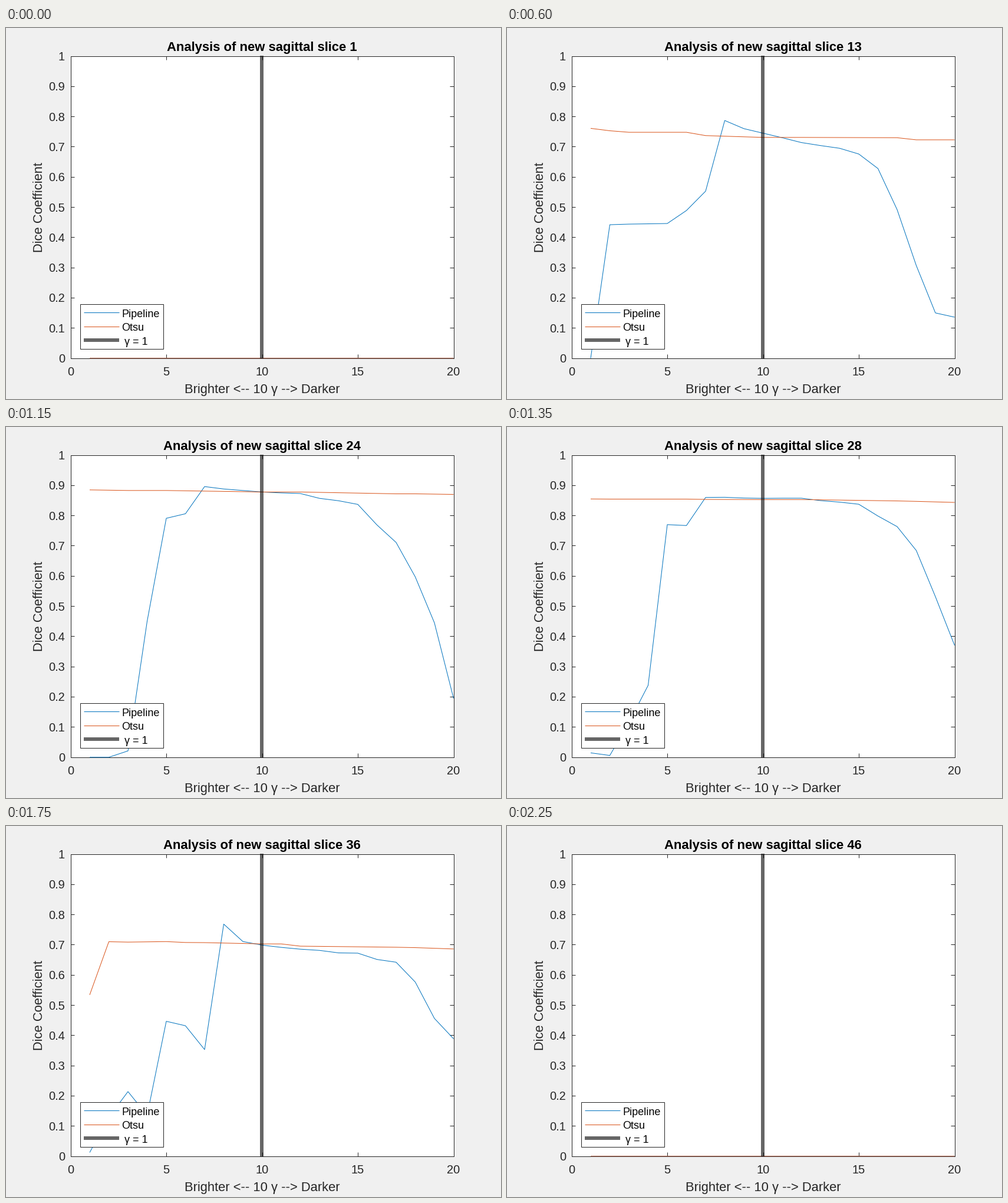
A matplotlib script for the animation above (2.3 s loop, 840x630 px).

```python
import numpy as np
import matplotlib.pyplot as plt
from matplotlib.animation import FuncAnimation
from matplotlib.patches import Rectangle

WIDTH, HEIGHT, DPI = 840, 630, 100
LEFT, RIGHT, TOP, BOTTOM = 109.5, 759.5, 47.5, 560.5
SLICES, INTERVAL = 46, 50
BLUE, ORANGE, INK = "#0072BD", "#D95319", "#262626"
PT = 72 / DPI

plt.rcParams["font.family"] = "Liberation Sans"

gamma = np.arange(1, 21)

# Dice scores in thousandths at key slices
PIPELINE = {
    13: [0, 442, 444, 445, 446, 489, 553, 787, 760, 745,
         730, 714, 704, 695, 676, 628, 492, 307, 150, 136],
    19: [0, 0, 0, 702, 707, 742, 829, 866, 863, 860,
         856, 853, 848, 825, 734, 651, 595, 418, 310, 199],
    24: [0, 0, 21, 450, 791, 806, 896, 888, 883, 878,
         875, 873, 857, 849, 837, 769, 711, 597, 445, 195],
    32: [29, 12, 210, 26, 749, 728, 824, 833, 833, 836,
         840, 842, 842, 840, 838, 828, 816, 772, 618, 546],
    39: [0, 217, 217, 218, 220, 210, 0, 720, 619, 596,
         580, 568, 561, 548, 548, 519, 512, 430, 335, 271],
}
OTSU_GAMMA = [1, 2, 3, 5, 6, 7, 10, 11, 12, 17, 18, 20]
OTSU = {
    13: [761, 753, 748, 748, 748, 737, 731, 731, 731, 730, 723, 723],
    19: [864, 863, 863, 863, 863, 863, 859, 859, 858, 857, 854, 855],
    24: [885, 884, 883, 883, 882, 881, 878, 878, 878, 872, 872, 870],
    32: [825, 825, 826, 826, 827, 826, 828, 828, 828, 825, 822, 817],
    39: [316, 624, 621, 624, 618, 618, 609, 609, 596, 592, 592, 588],
}
EMPTY_UNTIL, EMPTY_FROM = 5, 44


def scores(table, knots, number):
    """Dice curve of a slice, blended between its neighbouring key slices."""
    keys = [EMPTY_UNTIL, *table, EMPTY_FROM]
    rows = [np.interp(gamma, knots, row) / 1000 for row in table.values()]
    empty = np.zeros(len(gamma))
    rows = np.array([empty, *rows, empty])
    return np.array([np.interp(number, keys, column) for column in rows.T])


def px(x):
    return LEFT + (RIGHT - LEFT) * np.asarray(x) / 20


def py(y):
    return BOTTOM + 0.3 - (BOTTOM - TOP) * np.asarray(y)


fig = plt.figure(figsize=(WIDTH / DPI, HEIGHT / DPI), dpi=DPI, facecolor="#F0F0F0")
ax = fig.add_axes([0, 0, 1, 1])
ax.set_xlim(0, WIDTH)
ax.set_ylim(HEIGHT, 0)
ax.axis("off")


def line(xs, ys, color=INK, width=1, z=2, **style):
    style.setdefault("solid_capstyle", "butt")
    return ax.plot(xs, ys, color=color, lw=width * PT, zorder=z, **style)[0]


def label(x, y, text, size, color=INK, ha="center", **style):
    return ax.text(x, y, text, fontsize=size * PT, color=color, ha=ha,
                   va="baseline", rotation_mode="anchor", zorder=8, **style)


def box(x0, y0, x1, y1, z):
    ax.add_patch(Rectangle((x0, y0), x1 - x0, y1 - y0, facecolor="white",
                           edgecolor=INK, lw=PT, zorder=z))


# Plot area, ticks and labels
box(LEFT, TOP, RIGHT, BOTTOM, 1)
for value in range(0, 21, 5):
    x = px(value)
    line([x, x], [BOTTOM, BOTTOM - 6.5])
    line([x, x], [TOP, TOP + 6.5])
    label(x, 590, str(value), 20)
for tenth in range(11):
    y = BOTTOM - (BOTTOM - TOP) * tenth / 10
    line([LEFT, LEFT + 6.5], [y, y])
    line([RIGHT, RIGHT - 6.5], [y, y])
    label(100, y + 7.5, f"{tenth / 10:g}", 20, ha="right")
label(434.5, 620, "Brighter <-- 10 γ --> Darker", 22)
label(62, 304.5, "Dice Coefficient", 22, rotation=90)
title = label(434.5, 39, "", 22, "black", weight="bold")

# Curves and the vertical bar
curve = dict(snap=False, solid_joinstyle="round")
pipeline = line([], [], BLUE, z=3, **curve)
otsu = line([], [], ORANGE, z=4, **curve)
line([434.4, 434.4], [46.5, 561], "black", 6, z=5, alpha=0.6)

# Legend
box(125.5, 468.5, 266.5, 544.5, 6)
line([132, 191.5], [482.5, 482.5], BLUE, z=7)
line([132, 191.5], [506.5, 506.5], ORANGE, z=7)
line([132, 191.5], [530.4, 530.4], "#666666", 6, z=7)
label(196, 491, "Pipeline", 18, "black", "left")
label(196, 514, "Otsu", 18, "black", "left")
label(201, 538, "γ = 1", 18, "black", "left")


def update(step):
    number = step + 1
    title.set_text(f"Analysis of new sagittal slice {number}")
    pipeline.set_data(px(gamma), py(scores(PIPELINE, gamma, number)))
    otsu.set_data(px(gamma), py(scores(OTSU, OTSU_GAMMA, number)))
    return title, pipeline, otsu


animation = FuncAnimation(fig, update, frames=SLICES, interval=INTERVAL,
                          repeat=True, repeat_delay=0)
plt.show()
```
